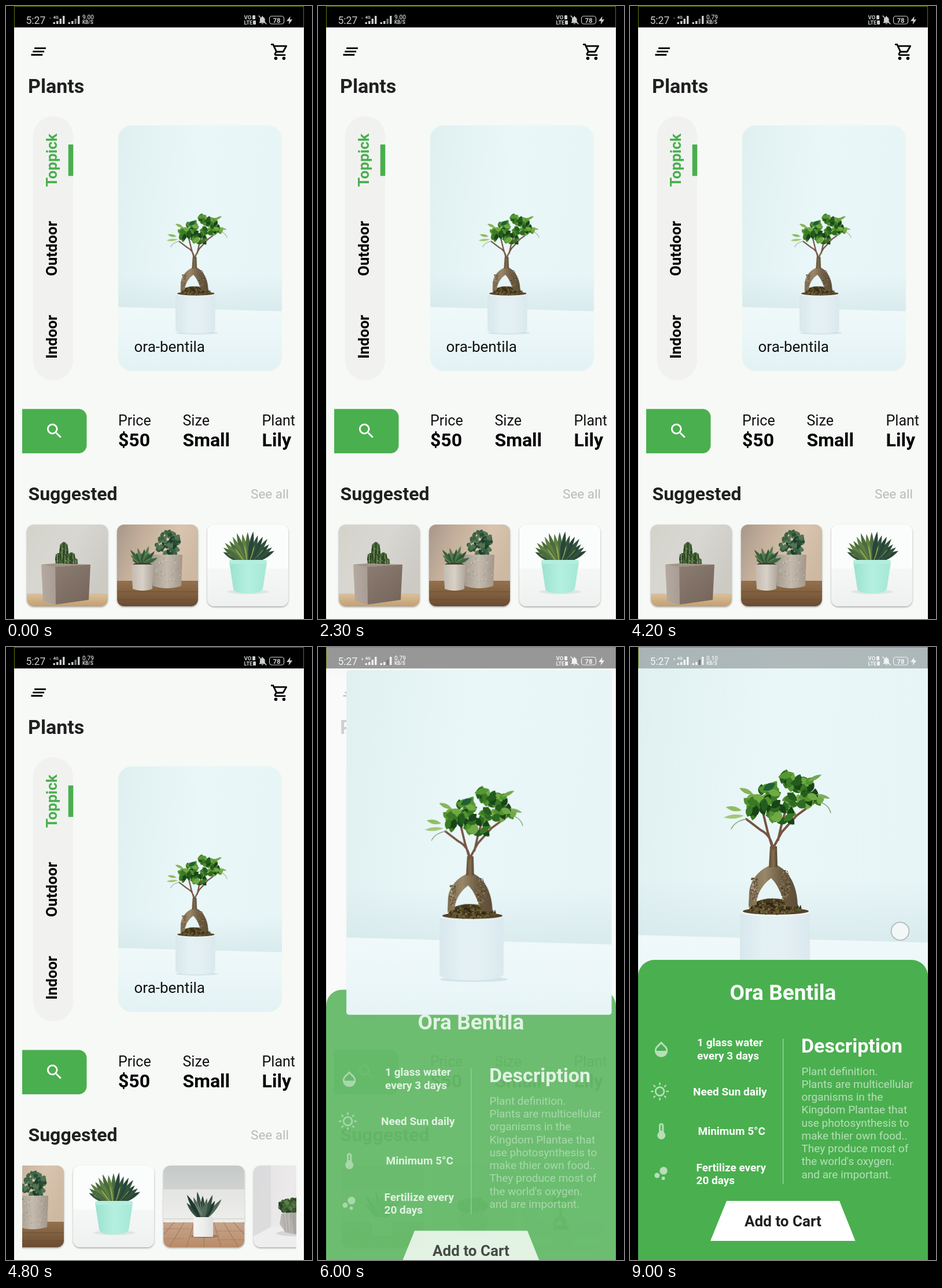
These frames come from a looping animation (529 by 1058 pixels, 9100 ms). An HTML page with a canvas:

```html
<!DOCTYPE html>
<html lang="en">
<head>
<meta charset="utf-8">
<title>Plant shop</title>
<style>
html, body { margin: 0; width: 100%; height: 100%; overflow: hidden; background: #000; }
canvas { display: block; width: 529px; height: 1058px; }
</style>
</head>
<body>
<canvas id="stage" width="529" height="1058"></canvas>
<script>
const ctx = document.getElementById('stage').getContext('2d');
ctx.imageSmoothingQuality = 'high';

const LOOP = 9100, LEFT = 14, RIGHT = 515, WIDTH = RIGHT - LEFT;
const GREEN = '#4aaf4f', PALE = '#b7dfb9', INK = '#1f201f';
const PLANT = 'Ora Bentila';

const ICON = {
  menu: 'M5 13h14v-2H5v2zm-2 4h14v-2H3v2zM7 7v2h14V7H7z',
  cart: 'M15.55 13c.75 0 1.41-.41 1.75-1.03l3.58-6.49A1 1 0 0 0 20 4H5.21l-.94-2H1v2h2l3.6 7.59-1.35 2.44C4.52 15.37 5.48 17 7 17h12v-2H7l1.1-2h7.45zM6.16 6h12.15l-2.76 5H8.53L6.16 6zM7 18a2 2 0 1 0 0 4 2 2 0 0 0 0-4zm10 0a2 2 0 1 0 0 4 2 2 0 0 0 0-4z',
  search: 'M15.5 14h-.79l-.28-.27A6.5 6.5 0 1 0 13.73 14.43l.27.28v.79l5 4.99L20.49 19l-4.99-5zm-6 0a4.5 4.5 0 1 1 0-9 4.5 4.5 0 0 1 0 9z',
  drop: 'M17.66 8L12 2.35 6.34 8C4.78 9.56 4 11.64 4 13.64s.78 4.11 2.34 5.67 3.61 2.35 5.66 2.35 4.1-.79 5.66-2.35S20 15.64 20 13.64 19.22 9.56 17.66 8zM6 14c.01-2 .62-3.27 1.76-4.4L12 5.27l4.24 4.38C17.38 10.77 17.99 12 18 14H6z',
  heat: 'M15 13V5c0-1.66-1.34-3-3-3S9 3.34 9 5v8a5 5 0 1 0 6 0zm-4-8c0-.55.45-1 1-1s1 .45 1 1h-1v1h1v2h-1v1h1v2h-2V5z',
  bell: 'M12 22a2 2 0 0 0 2-2h-4a2 2 0 0 0 2 2zM18 16v-5c0-3-1.6-5.6-4.5-6.3V4a1.5 1.5 0 0 0-3 0v.7C7.6 5.4 6 8 6 11v5l-2 2v1h16v-1z',
  bolt: 'M14 2L5 14h6l-1 8 9-12h-6z'
};

const clamp = v => Math.max(0, Math.min(1, v));
const mix = (a, b, p) => a + (b - a) * p;
const smooth = p => p * p * (3 - 2 * p);

function seeded(seed) {
  return () => (seed = (seed * 16807) % 2147483647) / 2147483647;
}

// Drawing helpers

function text(str, x, y, size, color, weight = 400, align = 'left') {
  ctx.font = `${weight} ${size}px Roboto, sans-serif`;
  ctx.fillStyle = color;
  ctx.textAlign = align;
  ctx.fillText(str, x, y);
}

function box(g, x, y, w, h, color, radius = 0) {
  g.beginPath();
  g.roundRect(x, y, w, h, radius);
  g.fillStyle = color;
  g.fill();
}

function oval(g, x, y, rx, ry, color, turn = 0) {
  g.beginPath();
  g.ellipse(x, y, rx, ry, turn, 0, 7);
  g.fillStyle = color;
  g.fill();
}

function shape(g, d, color) {
  g.fillStyle = color;
  g.fill(new Path2D(d), 'evenodd');
}

function line(g, d, width, color) {
  g.lineWidth = width;
  g.strokeStyle = color;
  g.lineCap = 'round';
  g.stroke(new Path2D(d));
}

function icon(name, x, y, scale, color) {
  ctx.save();
  ctx.translate(x, y);
  ctx.scale(scale, scale);
  shape(ctx, ICON[name], color);
  ctx.restore();
}

function blade(g, x, y, length, width, angle, color) {
  g.save();
  g.translate(x, y);
  g.rotate(angle);
  g.beginPath();
  g.moveTo(0, 0);
  g.quadraticCurveTo(length * .5, -width, length, 0);
  g.quadraticCurveTo(length * .5, width, 0, 0);
  g.fillStyle = color;
  g.fill();
  g.restore();
}

function fade(g, x0, y0, x1, y1, ...colors) {
  const grad = g.createLinearGradient(x0, y0, x1, y1);
  colors.forEach((c, i) => grad.addColorStop(i / (colors.length - 1), c));
  return grad;
}

function speckle(g, n, x, y, rx, ry, size, colors, seed) {
  const rnd = seeded(seed);
  for (let i = 0; i < n; i++) {
    const a = rnd() * 6.28, r = Math.sqrt(rnd());
    oval(g, x + Math.cos(a) * r * rx, y + Math.sin(a) * r * ry,
      size * (.5 + rnd()), size * (.4 + rnd() * .6), colors[Math.floor(rnd() * colors.length)], rnd() * 3);
  }
}

function sprite(w, h, scale, paint) {
  const c = document.createElement('canvas');
  c.width = w * scale;
  c.height = h * scale;
  const g = c.getContext('2d');
  g.scale(scale, scale);
  paint(g);
  return c;
}

const thumb = paint => sprite(140, 141, 2, paint);

// Pictures

const bonsai = sprite(501, 750, 1, g => {
  g.translate(-14, 57);
  box(g, 14, -57, 501, 750, fade(g, 14, 0, 515, 60, '#e0f0f1', '#eaf7f8', '#e7f5f6'));
  box(g, 14, 400, 501, 115, fade(g, 0, 400, 0, 508, 'rgba(206,227,231,0)', 'rgba(206,227,231,.55)'));
  shape(g, 'M14 498L515 511V693H14z', fade(g, 0, 498, 0, 693, '#f0f9fa', '#eaf6f8', '#e3f2f4'));
  line(g, 'M14 499L515 512', 4, 'rgba(240,249,250,.8)');
  oval(g, 255, 576, 64, 5, 'rgba(172,198,205,.4)');
  shape(g, 'M190 458H311V567Q306 578 250 578Q195 578 190 567z',
    fade(g, 190, 0, 311, 0, '#d8e8ed', '#e3f0f4', '#e3eff3', '#dae9ee'));
  oval(g, 250.5, 458, 60, 7, '#eef5f6');
  oval(g, 252, 456, 57, 6, '#56422a');
  shape(g, 'M204 456Q215 433 248 434Q282 435 296 456z', '#4d3b20');
  speckle(g, 190, 250, 449, 46, 12, 2.2, ['#2e2414', '#6d5731', '#43351d', '#817044', '#55612c'], 31);
  shape(g, 'M242 377C224 384 207 402 206 425L205 447L219 445C218 428 229 410 244 399C256 410 262 429 270 447L290 449C290 422 281 390 255 377z',
    fade(g, 204, 0, 292, 0, '#7b6a4f', '#9a8769', '#6b5b42', '#5c4c36'));
  speckle(g, 70, 215, 416, 6, 24, 1.3, ['#b5a488', '#5d4c35'], 7);
  speckle(g, 80, 268, 412, 8, 28, 1.3, ['#4a3a27', '#94815f'], 19);
  shape(g, 'M242 344H254L255 380H240z', fade(g, 240, 0, 256, 0, '#5f4b37', '#84704f', '#463727'));
  const bark = '#765443';
  line(g, 'M247 348Q244 325 226 316L201 297M246 346L238 319L229 282', 4, bark);
  line(g, 'M248 346L262 320L288 291L326 263M256 333L263 302L271 276', 4, bark);
  line(g, 'M201 297Q182 300 175 314M322 266Q343 270 347 286', 1.5, '#89a178');
  const greens = ['#235c1e', '#3a7926', '#52942f', '#2f6a23', '#71aa43', '#174517'];
  const rnd = seeded(83);
  const clusters = [[270, 228, 12, 9, 8], [294, 237, 22, 13, 20], [293, 263, 22, 13, 18],
    [240, 250, 14, 11, 12], [220, 266, 20, 8, 13], [247, 277, 22, 12, 18],
    [267, 293, 23, 8, 11], [318, 260, 15, 7, 6], [209, 281, 10, 8, 6]];
  for (const [x, y, sx, sy, n] of clusters) {
    for (let i = 0; i < n; i++) {
      const a = rnd() * 6.28, r = Math.sqrt(rnd()), turn = rnd() * 6.28;
      const px = x + Math.cos(a) * r * sx, py = y + Math.sin(a) * r * sy;
      blade(g, px - Math.cos(turn) * 10, py - Math.sin(turn) * 10, 18 + rnd() * 6, 12, turn, greens[Math.floor(rnd() * 6)]);
    }
  }
  blade(g, 213, 254, 26, 8, 3.55, '#87b45b');
  blade(g, 193, 282, 28, 8, 3.35, '#8fbd61');
  blade(g, 197, 291, 35, 7, 3.05, '#a4c878');
  blade(g, 307, 232, 27, 7, -.45, '#72a84a');
  blade(g, 322, 254, 25, 6, .3, '#80ad5d');
  blade(g, 256, 225, 29, 12, -.25, '#55982f');
  blade(g, 230, 247, 24, 12, -.5, '#1f6132');
});

const cactus = thumb(g => {
  box(g, 0, 0, 140, 141, fade(g, 0, 0, 140, 80, '#d5d4cb', '#d8d7d2', '#cdcac4'));
  box(g, 0, 119, 140, 22, fade(g, 0, 119, 0, 141, '#d9c19d', '#c69f71'));
  const rnd = seeded(5);
  for (const [x, y, rx, ry] of [[55, 60, 6, 11], [64, 49, 8, 19], [77, 60, 7, 12], [69, 63, 8, 13], [83, 65, 5, 7]]) {
    oval(g, x, y, rx, ry, '#3c5a30');
    for (let k = -2; k < 3; k++) oval(g, x + k * rx * .38, y, .8, ry * .85, k % 2 ? '#6e8950' : '#243f20');
    for (let i = 0; i < 9; i++) oval(g, x + (rnd() - .5) * rx * 1.6, y + (rnd() - .5) * ry * 1.6, .7, .7, '#a4ac79');
  }
  shape(g, 'M25 69L50 67L110 69L49 74z', '#a0948a');
  shape(g, 'M25 69L49 73L50 138L28 132z', fade(g, 25, 0, 50, 0, '#b5aaa1', '#a99d94'));
  shape(g, 'M49 73L110 69L107 130L50 138z', fade(g, 49, 70, 108, 135, '#8c7d72', '#75655a'));
});

const pair = thumb(g => {
  box(g, 0, 0, 140, 141, fade(g, 0, 0, 140, 60, '#a8988a', '#c5b09c', '#d9c4af', '#cdb8a2'));
  box(g, 0, 97, 140, 44, fade(g, 0, 97, 0, 141, '#94714e', '#81603f', '#6b4b32'));
  line(g, 'M0 116H140M0 130H140', .7, '#664831');
  speckle(g, 90, 89, 32, 21, 20, 4, ['#294b34', '#3c6344', '#1f3d2a', '#517453'], 17);
  shape(g, 'M59 52H113L111 106Q86 114 62 106z', fade(g, 59, 0, 113, 0, '#a39a8f', '#c4bbae', '#a3978a'));
  speckle(g, 45, 88, 80, 23, 25, .8, ['#827b70', '#9d8068', '#ded8cb'], 9);
  for (let i = 0; i < 12; i++) blade(g, 44, 70, 20 + i * 7 % 17, 6, -2.65 + i * .2, ['#2e5437', '#567b4c', '#3b643f'][i % 3]);
  oval(g, 44, 69, 17, 3, '#4b3e2c');
  shape(g, 'M25 69H63L61 111Q44 117 27 111z', fade(g, 25, 0, 63, 0, '#c3bbb0', '#d8d1c7', '#b0a69a'));
});

const aloe = thumb(g => {
  box(g, 0, 0, 140, 141, '#fbfcfc');
  box(g, 0, 76, 140, 65, fade(g, 0, 76, 0, 141, '#f6f7f7', '#eff1f1'));
  oval(g, 71, 116, 36, 4, 'rgba(190,210,205,.4)');
  for (let i = 0; i < 15; i++) {
    const spread = i * 7 % 15 / 14, angle = -2.65 + spread * 2.15;
    const length = 37 + Math.sin(spread * 3.14) * 13 + i % 3 * 2;
    blade(g, 70 + (spread - .5) * 20, 65, length, 8, angle, ['#33523a', '#4a6b42', '#28463a', '#60803f'][i % 4]);
    if (i % 3 == 0) blade(g, 70 + (spread - .5) * 20, 64, 30, 2.5, angle, '#9aae55');
  }
  shape(g, 'M38 65Q70 57 103 65L96 111Q92 119 70 119Q48 119 45 111z', fade(g, 38, 0, 103, 0, '#9be2cf', '#b5f0df', '#a4e8d5'));
  box(g, 38, 61, 65, 7, '#b3eedf', 3);
});

const sansevieria = thumb(g => {
  box(g, 0, 0, 140, 141, fade(g, 0, 0, 0, 100, '#c5cac8', '#d3d5d3', '#e3e3e1'));
  box(g, 0, 40, 140, 58, fade(g, 0, 40, 0, 98, '#e4e5e3', '#eeeeec'));
  line(g, 'M0 40H140M0 92H140', 1, '#c8cbc8');
  box(g, 0, 98, 140, 43, fade(g, 0, 98, 0, 141, '#c7a58b', '#b98c6a'));
  for (let i = -5; i <= 5; i++) line(g, `M${70 + i * 17} 98L${70 + i * 30} 141`, .7, '#8f6a52');
  line(g, 'M0 109H46M88 113H140M0 126H36M93 128H140', .6, '#97735a');
  for (let i = 0; i < 9; i++) {
    const spread = i * 4 % 9 / 8, angle = -2.25 + spread * 1.35;
    blade(g, 68 + (spread - .5) * 8, 94, 38 + i % 4 * 4, 7, angle, ['#354f42', '#1f392f', '#53675a'][i % 3]);
    if (i % 2) blade(g, 68, 90, 34, 1, angle, '#93a18a');
  }
  oval(g, 71, 122, 24, 3, 'rgba(92,62,43,.35)');
  box(g, 52, 89, 34, 34, fade(g, 52, 0, 86, 0, '#f5f5f3', '#eeeeec', '#dedfdd'), 1);
});

const bush = thumb(g => {
  box(g, 0, 0, 140, 141, fade(g, 0, 0, 140, 30, '#e4e3e4', '#eceaeb', '#dedcdd'));
  shape(g, 'M0 0H30V107L0 125z', 'rgba(214,213,215,.6)');
  shape(g, 'M0 122L30 106H140V141H0z', '#efeeee');
  oval(g, 73, 117, 34, 5, 'rgba(145,141,143,.25)');
  speckle(g, 170, 70, 70, 25, 13, 3.5, ['#344f2e', '#476b3a', '#5d7e49', '#263f25'], 77);
  shape(g, 'M48 83L63 81L88 82L97 92L89 115L75 119L55 115L45 101z', '#aca8a6');
  shape(g, 'M48 83L63 82L70 119L55 115L45 101z', '#bbb7b5');
  shape(g, 'M82 82L88 82L97 92L89 115L75 119z', '#989492');
  for (let i = 0; i < 7; i++) line(g, `M${51 + i * 6} 84L${55 + i * 5} 115`, .5, '#8d8987');
});

const suggested = [cactus, pair, aloe, sansevieria, bush, bonsai];

function picture(img, x, y, w, h, radius) {
  const scale = Math.max(w / img.width, h / img.height);
  const iw = img.width * scale, ih = img.height * scale;
  ctx.save();
  ctx.beginPath();
  ctx.roundRect(x, y, w, h, radius);
  ctx.clip();
  ctx.drawImage(img, x + (w - iw) / 2, y + (h - ih) / 2, iw, ih);
  ctx.restore();
}

// Screens

const LIST = { left: 28, width: 474, pitch: 156, gap: 8 };
const SCROLL_END = suggested.length * LIST.pitch - LIST.width;
const flings = [[2300, 3000, SCROLL_END], [3400, 4150, 0], [4400, 5200, SCROLL_END]];

function scrollAt(t) {
  return flings.reduce((pos, [from, to, goal]) => mix(pos, goal, smooth(clamp((t - from) / (to - from)))), 0);
}

function suggestions(scroll) {
  ctx.save();
  ctx.beginPath();
  ctx.rect(LIST.left, 885, LIST.width, 160);
  ctx.clip();
  suggested.forEach((img, i) => {
    const x = LIST.left + LIST.gap + LIST.pitch * i - scroll;
    ctx.save();
    ctx.shadowColor = 'rgba(0,0,0,.35)';
    ctx.shadowBlur = 3;
    ctx.shadowOffsetY = 1.5;
    box(ctx, x, 895, 140, 141, '#f4f6f5', 12);
    ctx.restore();
    picture(img, x, 895, 140, 141, 12);
  });
  ctx.restore();
}

function sideLabel(str, y, color) {
  ctx.save();
  ctx.translate(88, y);
  ctx.rotate(-Math.PI / 2);
  text(str, 0, 0, 26, color, 700, 'center');
  ctx.restore();
}

function home(t, showHero) {
  box(ctx, LEFT, 0, WIDTH, 1058, '#f7f9f7');
  icon('menu', 39.2, 61.6, 1.417, '#000');
  icon('cart', 456.6, 62.2, 1.4, '#000');
  text('Plants', 38, 150, 34, INK, 700);

  box(ctx, 47, 190, 69, 456, '#f1f2f0', 34.5);
  box(ctx, 107.7, 239, 8.6, 54.3, GREEN);
  sideLabel('Toppick', 266, GREEN);
  sideLabel('Outdoor', 418.5, '#000');
  sideLabel('Indoor', 571, '#000');

  if (showHero) picture(bonsai, 193.7, 206, 283.3, 424.3, 24);
  text('ora-bentila', 221.5, 597, 26, '#111');

  box(ctx, 28, 695.5, 111.5, 76.5, GREEN, [0, 14, 14, 0]);
  icon('search', 66.7, 716.5, 1.42, '#fff');
  for (const [x, label, value] of [[194, 'Price', '$50'], [305.5, 'Size', 'Small'], [442.6, 'Plant', 'Lily']]) {
    text(label, x, 724, 25, '#111');
    text(value, x, 760, 32, '#000', 700);
  }

  text('Suggested', 38.5, 853, 32, INK, 700);
  text('See all', 489, 850, 22.5, '#b9bbb9', 400, 'right');
  suggestions(scrollAt(t));
}

function sun(x, y) {
  ctx.beginPath();
  ctx.arc(x, y, 7.4, 0, 7);
  ctx.lineWidth = 2.7;
  ctx.strokeStyle = PALE;
  ctx.stroke();
  for (let i = 0; i < 8; i++) {
    const c = Math.cos(i * Math.PI / 4), s = Math.sin(i * Math.PI / 4);
    line(ctx, `M${x + c * 12} ${y + s * 12}L${x + c * 14.3} ${y + s * 14.3}`, 2.5, PALE);
  }
}

function detail(showHero) {
  box(ctx, LEFT, 0, WIDTH, 1400, '#fafafa');
  if (showHero) picture(bonsai, LEFT, 0, WIDTH, 636, 0);
  box(ctx, LEFT, 540, WIDTH, 860, GREEN, [28, 28, 0, 0]);
  text(PLANT, 264.5, 609, 37, '#fff', 700, 'center');

  icon('drop', 37.2, 677.5, 1.4, PALE);
  sun(51.5, 767);
  icon('heat', 37.4, 819, 1.4, PALE);
  oval(ctx, 46.8, 912, 4.5, 4.5, PALE);
  oval(ctx, 57.6, 917, 2.9, 2.9, PALE);
  oval(ctx, 58, 904, 6.7, 6.7, PALE);
  for (const [str, x, y] of [['1 glass water', 116, 689], ['every 3 days', 116, 711.5], ['Need Sun daily', 109, 774],
    ['Minimum 5°C', 117.5, 842], ['Fertilize every', 114.5, 905], ['20 days', 114.5, 927]]) {
    text(str, x, y, 19, '#fff', 700);
  }
  box(ctx, 264, 676, 1.3, 251, '#a3d6a6');

  text('Description', 296, 700, 34, '#fff', 700);
  ['Plant definition.', 'Plants are multicellular', 'organisms in the', 'Kingdom Plantae that', 'use photosynthesis to',
    'make thier own food..', 'They produce most of', "the world's oxygen.", 'and are important.']
    .forEach((row, i) => text(row, 296.5, 738.5 + i * 22.25, 19, PALE));

  shape(ctx, 'M167 956H362L389.5 1025H139z', '#fff');
  text('Add to Cart', 264.5, 1000, 26, INK, 700, 'center');
}

function statusBar(t, p) {
  const dark = p < .5, tint = dark ? '#c9cdca' : '#f0f3f3', edge = dark ? '#5a7a08' : '#819b2d';
  box(ctx, LEFT, 0, WIDTH, 37, `rgba(0,0,0,${mix(1, .25, p)})`);
  box(ctx, LEFT, 0, WIDTH, 1, edge);
  box(ctx, LEFT, 0, 1, 37, edge);
  box(ctx, RIGHT - 1, 0, 1, 37, edge);

  text('5:27', 34.5, 31, 17.5, tint);
  oval(ctx, 76.5, 21, 1.2, 1.6, dark ? '#4b4d4b' : tint);
  text('4G', 81.5, 22, 7.5, tint, 700);
  [3, 5, 9, 14].forEach((h, i) => {
    box(ctx, 81.5 + i * 5.5, 31 - h, 3.5, h, tint);
    box(ctx, 107.5 + i * 5.5, 31 - h, 3.5, h, i === 2 ? '#777b78' : tint);
  });
  text(t < 4000 ? '9.00' : t < 8000 ? '0.79' : '0.10', 132, 23, 10, tint, 500);
  text('KB/S', 132, 31, 8.3, tint, 700);

  text('VO', 411.5, 23, 9.5, tint, 700);
  text('LTE', 411.5, 32, 9, tint, 700);
  box(ctx, 426, 16, 5, 7, tint, 1);
  box(ctx, 427, 25, 5, 7, tint, 1);
  icon('bell', 434.5, 15.5, .73, tint);
  line(ctx, 'M437 17L450 31', 1.5, tint);
  ctx.beginPath();
  ctx.roundRect(455.5, 17.5, 25, 13.5, 4);
  ctx.lineWidth = 1.2;
  ctx.strokeStyle = tint;
  ctx.stroke();
  text('78', 468, 28.5, 11.5, tint, 700, 'center');
  icon('bolt', 481.5, 16, .72, tint);
}

function touch(t) {
  if (t < 8800) return;
  const x = mix(497, 467, clamp((t - 8800) / 200));
  oval(ctx, x, 490.5, 15.5, 15.5, 'rgba(244,247,247,.92)');
  ctx.lineWidth = 2;
  ctx.strokeStyle = '#b6c0c1';
  ctx.stroke();
}

function render(t) {
  const opening = clamp((t - 5750) / 350), p = smooth(opening);
  ctx.fillStyle = '#000';
  ctx.fillRect(0, 0, 529, 1058);
  ctx.save();
  ctx.beginPath();
  ctx.rect(LEFT, 0, WIDTH, 1058);
  ctx.clip();
  if (opening < 1) home(t, opening === 0);
  if (opening > 0) {
    ctx.save();
    ctx.globalAlpha = p;
    ctx.translate(0, 264 * (1 - p));
    detail(opening === 1);
    ctx.restore();
    if (opening < 1) {
      picture(bonsai, mix(194, LEFT, p), mix(206, 0, p), mix(283, WIDTH, p), mix(424, 636, p), mix(24, 0, p));
    }
  }
  statusBar(t, p);
  touch(t);
  ctx.restore();
}

const start = performance.now();
function tick() {
  render((performance.now() - start) % LOOP);
  requestAnimationFrame(tick);
}
tick();
</script>
</body>
</html>
```
